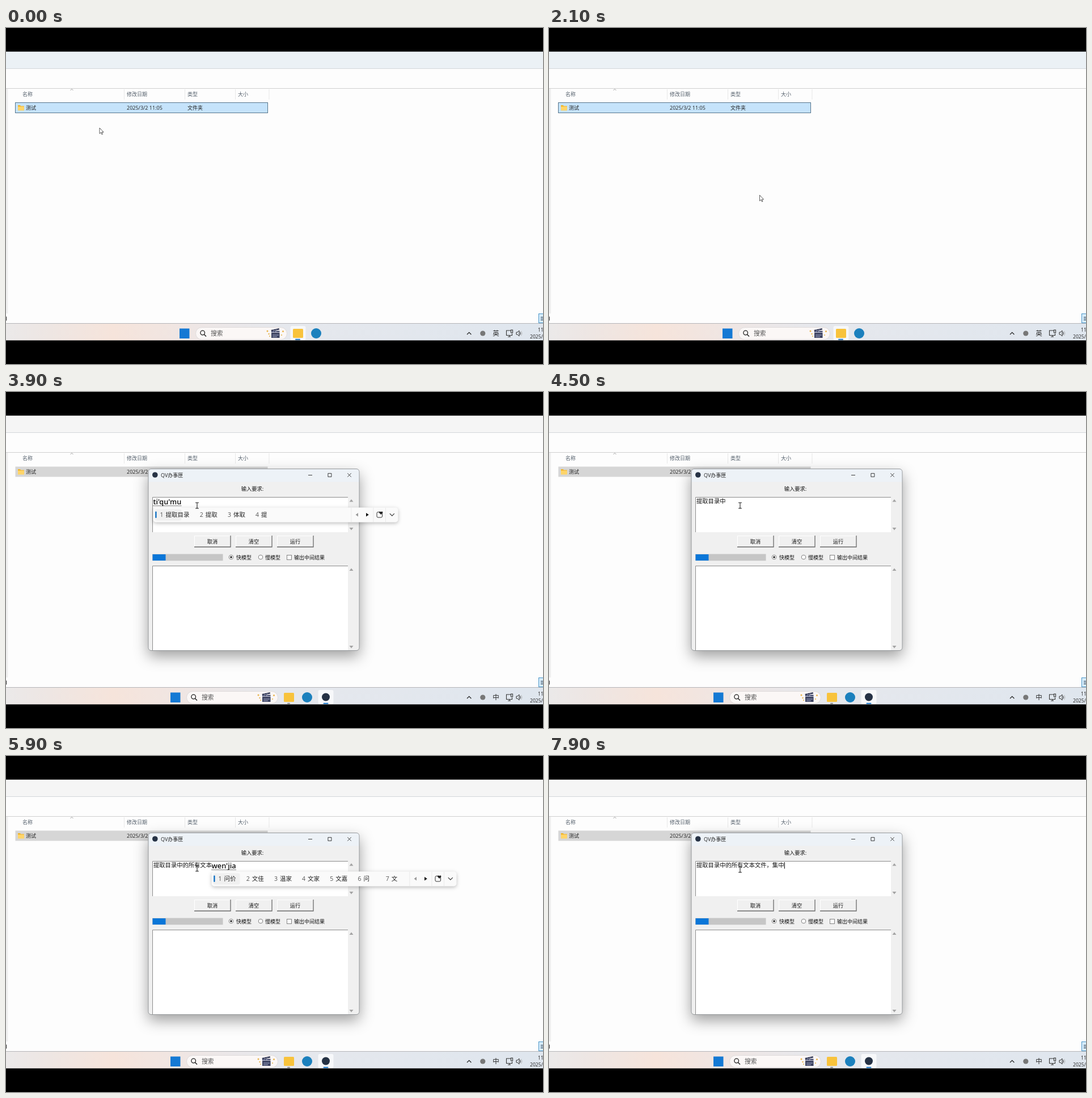
Animation of 947x592 px, one loop 8000 ms. Source, as an HTML page:

```html
<!DOCTYPE html>
<html lang="zh">
<head>
<meta charset="utf-8">
<style>
  html, body { margin: 0; width: 100%; height: 100%; overflow: hidden; background: #000; }
  svg { display: block; width: 947px; height: 592px; font-family: "Open Sans", "Noto Sans CJK SC", "Noto Sans CJK", sans-serif; }
  text { white-space: pre; }
  .entry { font-family: "Liberation Sans", "Noto Sans CJK SC", "Noto Sans CJK", sans-serif; }
  #menu { filter: drop-shadow(1px 2px 2px rgba(0,0,0,.22)); }
  #dialog .frame { filter: drop-shadow(0 10px 13px rgba(0,0,0,.38)); }
  #ime .frame { filter: drop-shadow(0 2px 3px rgba(0,0,0,.25)); }
</style>
</head>
<body>
<svg id="stage" viewBox="0 0 947 592"></svg>
<script>
const $ = id => document.getElementById(id);
const rect = (x, y, w, h, fill, more = '') =>
  `<rect x="${x}" y="${y}" width="${w}" height="${h}" fill="${fill}" ${more}/>`;
const circle = (x, y, r, fill, more = '') => `<circle cx="${x}" cy="${y}" r="${r}" fill="${fill}" ${more}/>`;
const line = (d, color, width = 1, more = '') =>
  `<path d="${d}" fill="none" stroke="${color}" stroke-width="${width}" ${more}/>`;
const shape = (d, fill, more = '') => `<path d="${d}" fill="${fill}" ${more}/>`;
// y is the middle of the glyphs
const text = (x, y, str, size = 9, fill = '#222', more = '') =>
  `<text x="${x}" y="${y + size * .37}" font-size="${size}" fill="${fill}" ${more}>${str}</text>`;
const group = (id, body) => `<g id="${id}">${body}</g>`;

const APP = 'QV办事匣';

function explorer() {
  const headers = [[29, '名称'], [213, '修改日期'], [320, '类型'], [409, '大小']];
  return rect(0, 41.5, 947, 509, '#fdfdfd') +
    rect(0, 41.5, 947, 30, '#ebf1f5', 'id="titlebar"') +
    rect(0, 71, 947, 1, '#d3d7da') + rect(0, 106, 947, 1, '#cfcfcf') +
    rect(0, 107, 3.5, 396, '#efefef') +
    headers.map(([x, s]) => text(x, 117, s, 9, '#55606c')).join('') +
    [208, 315, 404, 463.5].map(x => rect(x, 108, 1, 18, '#e8e8e8')).join('') +
    line('M113.5 110l2.5-2.5 2.5 2.5', '#888', .8) +
    rect(16.5, 131.5, 445, 18, '#c5e3fb', 'id="row"') +
    shape('M21 136h4l1 1.5h6v7.500h-11z', '#f0b429') + shape('M21 138.500h11v7h-11z', '#ffd56a') +
    text(35, 141, '测试') + text(213, 141, '2025/3/2 11:05') + text(320, 141, '文件夹') +
    rect(0, 508.500, 1.2, 7, '#444') +
    rect(939.5, 503.5, 12, 16, '#d5ebfa', 'stroke="#4b96c8"') +
    line('M943 509.5h4M943 512h4M943 514.500h4', '#345', 1);
}

function taskbar() {
  const icons =
    rect(306, 529.5, 17.5, 17.5, '#1479d4') +
    rect(334.5, 527.5, 161, 21.5, '#fbf7f6', 'rx="10.7" stroke="#dfdbdb"') +
    circle(346.7, 537, 3.8, 'none', 'stroke="#222" stroke-width="1.3"') +
    line('M349.500 540l3.500 3.500', '#222', 1.5) +
    text(361, 538.3, '搜索', 10.8, '#555') +
    rect(468, 537, 14.500, 9, '#3c4260') + rect(468, 533.5, 14.500, 2.8, '#4b5274') +
    shape('M467.500 532l14-3 .6 2.600-14 3z', '#343a56') +
    line('M471 531.5l2 2M475.500 530.5l2 2M471 537v-3M476 537v-3M470 541h11M470 544h8', '#b9bfdc', .9) +
    [[461, 534, 1.5], [463.500, 539, 1.2], [465, 543, 1], [488.500, 534.5, 1.5], [486, 541, 1.1]]
      .map(([x, y, r]) => circle(x, y, r, '#e9b44c')).join('') +
    rect(501.500, 525, 27, 25, '#fff', 'rx="3" opacity=".65" class="calm"') +
    rect(506, 530, 18, 16, '#f8c33c', 'rx="1.5"') +
    rect(510, 547.8, 9, 2, '#1976c9', 'rx="1" class="calm"') +
    rect(512, 547.8, 5, 2, '#8c8c8c', 'rx="1" class="busy"') +
    circle(547, 538, 9, '#1b80bd') +
    `<g class="busy">${rect(566.5, 525, 27, 25, '#fff', 'rx="3" opacity=".7"')}${
      circle(580, 537.5, 7, '#263245')}${rect(575.5, 547.8, 9, 2, '#1976c9', 'rx="1"')}</g>`;
  return `<linearGradient id="sky"><stop stop-color="#ebe9e9"/><stop offset=".08" stop-color="#eee6e3"/>
    <stop offset=".2" stop-color="#f6e4db"/><stop offset=".34" stop-color="#efe6e4"/>
    <stop offset=".5" stop-color="#e6e8ed"/><stop offset="1" stop-color="#dfe6ee"/></linearGradient>` +
    rect(0, 520, 947, 30.5, 'url(#sky)') + rect(0, 520, 947, 1, '#b5b5b8') +
    group('icons', icons) +
    line('M813 540l3.700-3.700 3.700 3.700', '#222', 1.2) +
    circle(840.8, 538, 4.6, '#777') +
    `<g id="lang">${text(858.3, 538, '英', 11.5)}</g>` +
    line('M890 533h-7.500v8.500h10v-3M885 544h5M888 541.500v2M890.500 532h3v5h-3z', '#333', 1.1) +
    shape('M900 536h2l3-3v10l-3-3h-2z', 'none', 'stroke="#333"') +
    line('M906.500 535.500q2 2.500 0 5', '#333') + line('M908.500 534q3 4 0 8', '#aaa', .8) +
    text(938, 532, '11:05', 8.6) + text(924, 544, '2025/3/2', 8.6);
}

const ROWS = ['打开(O)', '在新进程中打开(P)', '在新标签页中打开(B)', '在新窗口中打开(E)', '固定到快速访问(Q)',
  '在终端中打开(T)', 'Open Git GUI here', 'Open Git Bash here', APP, '在此处打开 Powershell 窗口(S)',
  '使用 Norvamill Shielder扫描...', '-', '授予访问权限(G)>', '还原以前的版本(V)', '包含到库中(I)>', '固定到“开始”(P)',
  '复制文件地址(A)', '-', '发送到(N)>', '-', '剪切(T)', '复制(C)', '-', '创建快捷方式(S)', '删除(D)', '重命名(M)', '-', '属性(R)'];

function menu() {
  let y = 118.8, out = rect(168.5, 108.5, 209.5, 411.5, '#f8f8f8', 'rx="2" stroke="#d2d2d2"') +
    rect(171, 0, 205, 16, '#efefef', 'rx="2" id="hover"');
  ROWS.forEach((row, i) => {
    if (row === '-') {
      out += rect(169, y - 5.9, 209, 1, '#dedede');
      y += 5;
      return;
    }
    if (row.endsWith('>')) out += line(`M365 ${y - 2.700}l2.700 2.700-2.700 2.700`, '#333');
    out += text(194.5, y, row.replace('>', ''), 9, '#222', i ? '' : 'font-weight="700"');
    y += 16.58;
  });
  return out + rect(175.5, 197, 11, 9.500, '#333') +
    rect(176.500, 213.500, 9, 9, '#e59a63') + rect(176.500, 230, 9, 9, '#e59a63') +
    circle(181, 251.4, 5, '#222') + circle(181, 284.6, 5.2, '#1673c8');
}

function dialog() {
  const field = (y, h) => rect(258, y, 345, h, '#fff') + line(`M258.500 ${y + h}V${y + .5}H603`, '#8c8c8c');
  const up = y => shape(`M605.5 ${y + 2}h7l-3.500-4.500z`, '#a3a3a3');
  const down = y => shape(`M605.5 ${y - 2}h7l-3.500 4.500z`, '#a3a3a3');
  const button = (x, s) => rect(x, 253, 64.500, 20.5, '#f0f0f0') +
    line(`M${x + .5} 273V253.500H${x + 64}`, '#fff') +
    line(`M${x} 273H${x + 64}V253`, '#6b6b6b', 1.3) +
    text(x + 32, 263.5, s, 9.2, '#111', 'text-anchor="middle"');
  const radio = x => circle(x, 291, 3.8, '#fff', 'stroke="#777" stroke-width=".9"');
  return rect(251, 135.5, 372, 320, '#f0f0f0', 'rx="5" class="frame"') +
    shape('M251 158.500V140.500q0-5 5-5H618q5 0 5 5V158.500z', '#edf2f7') +
    circle(262.8, 146, 4.8, '#263245') + text(273, 146.7, APP) +
    line('M533 146.500h7M567.900 143.400h6v6h-6zM602.300 143.200l6.400 6.400M608.700 143.200l-6.400 6.400', '#333', .95) +
    text(434.5, 170.5, '输入要求:', 9.3, '#111', 'text-anchor="middle"') +
    field(185, 62) + up(191.5) + down(241) +
    button(332, '取消') + button(405, '清空') + button(478, '运行') +
    rect(258, 285.5, 124.500, 11.800, '#c6c6c6') + rect(258.5, 286, 23, 11, '#0a76d8') +
    radio(397) + circle(397, 291, 1.700, '#111') + text(406, 291.5, '快模型', 9, '#111') +
    radio(449) + text(457, 291.5, '慢模型', 9, '#111') +
    rect(495.5, 287.500, 8, 8, '#fff', 'stroke="#777" stroke-width=".9"') + text(508, 291.5, '输出中间结果', 9, '#111') +
    field(306, 149) + up(313) + down(449) +
    rect(251, 135.5, 372, 320, 'none', 'rx="5" stroke="#8f9296" stroke-width=".9"') +
    group('entry', '');
}

$('stage').innerHTML = explorer() + taskbar() + group('menu', menu()) + group('dialog', dialog()) +
  group('ime', '') +
  group('arrow', shape('M0 0v10.200l2.400-2.200 1.600 3.600 1.500-.7-1.600-3.400h3.200z', '#fff', 'stroke="#333" stroke-width=".8"')) +
  group('beam', line('M-3 -5h2.200l.8 .7 .8-.7h2.200M0 -5v10M-3 5h2.200l.8-.7 .8 .7h2.200', '#222', 1.1)) +
  rect(0, 0, 947, 41.5, '#000') + rect(0, 550.5, 947, 42, '#000');

const OLD = '解压这个文件并提取里面的jpg文件到一个目录';
const FULL = '提取目录中的所有文本文件，集中';
const PITCH = 10.3, LEFT = 260;
// start, end, characters before, characters after, pinyin, candidates
const PHRASES = [
  [3500, 4400, 0, 5, "ti'qu'mu'lu'zhong", '提取目录 提取 体取 提'],
  [4700, 5100, 5, 8, "de'suo'you", '的所有 的 得 地 德'],
  [5200, 5500, 8, 10, "wen'ben", '文本 文笨 问本 温本 闻本 问 文'],
  [5550, 6050, 10, 12, "wen'jian", '问价 文佳 温家 文家 文嘉 问 文'],
  [6400, 6400, 12, 13, '', ''],
  [6900, 7600, 13, 15, "ji'zhong", '集中 几种 机种 记重 及中 集 几']];

function candidates(x0, words) {
  let x = x0 + 12, out = rect(x0, 203.5, 432, 26, '#fafafa', 'rx="5" class="frame"') +
    rect(x0 + 3, 206.5, 47, 20, '#f0f0f0', 'rx="3"') + rect(x0 + 3.800, 210.500, 2.2, 11.5, '#0067c0', 'rx="1"');
  words.forEach((word, i) => {
    out += text(x, 216.5, i + 1, 10.5, '#555') + text(x + 10, 216.5, word, 10.5);
    x += Math.max(49.2, 28.2 + 10.5 * word.length);
  });
  return out + `<g transform="translate(${x0 - 362} 0)">` +
    [711, 750, 771.500].map(v => rect(v, 204, .8, 25, '#e6e6e6')).join('') +
    shape('M723.500 213v6.500l-4.500-3.250z', '#999') + shape('M737.500 213v6.500l4.800-3.250z', '#111') +
    rect(756.500, 211.500, 9.5, 9.5, 'none', 'rx="2" stroke="#333"') +
    shape('M763.700 216l-3-3q-.6-2.600 1.500-2.500l1.500 1 1.500-1q2.300 0 1.500 2.500z', '#222') +
    line('M779.300 214.200l4 4 4-4', '#333', 1.1) + '</g>';
}

function drawEntry(t) {
  const write = (str, fill = '#111') => text(LEFT, 192.5, str, PITCH, fill, 'class="entry"');
  let body, bar = '';
  if (t < 3500) {
    const selected = t >= 3100;
    body = (selected ? rect(259, 186.500, 209.5, 12, '#0a76d8') : '') + write(OLD, selected ? '#fff' : '#111');
  } else {
    const [start, end, before, after, pinyin, words] = PHRASES.filter(p => p[0] <= t).pop();
    const typing = t < end, count = typing ? before : after, x = LEFT + count * PITCH;
    body = write(FULL.slice(0, count));
    if (typing) {
      const shown = Math.floor((t - start + 100) / (end - start) * pinyin.length);
      const part = pinyin.slice(0, Math.max(1, shown)).replace(/'$/, '');
      const list = words.split(' ');
      if (part === pinyin) list[0] = FULL.slice(before, after);
      body += `<text id="pinyin" x="${x - .5}" y="197.800" font-size="12.7" font-weight="600" fill="#111">${part}</text>`;
      bar = candidates(x - .5, list);
    } else if (t % 900 >= 300) body += rect(x + .300, 187, 1.1, 11.5, '#111');
  }
  $('entry').innerHTML = body;
  $('ime').innerHTML = bar;
  if (bar) {
    const box = $('pinyin'), x = +box.getAttribute('x');
    $('entry').innerHTML += line(`M${x} 200.500h${box.getComputedTextLength()}`, '#222', 1, 'stroke-dasharray="1.2 1"');
  }
}

const PATH = [[0, 165, 176], [200, 165, 176], [700, 168, 141], [900, 168, 141], [1000, 253.500, 239],
  [1300, 250, 250], [1900, 250, 250], [2100, 371.500, 294.500], [2400, 371.500, 294.500], [2900, 337, 200],
  [4500, 337, 200], [5500, 337, 198], [6500, 337, 198], [7000, 337, 200], [8000, 337, 200]];

function pointer(t) {
  const i = PATH.findIndex(p => p[0] > t), [t0, x0, y0] = PATH[i - 1], [t1, x1, y1] = PATH[i];
  const k = (t - t0) / (t1 - t0);
  return [x0 + (x1 - x0) * k, y0 + (y1 - y0) * k];
}

const show = (el, on) => el.setAttribute('visibility', on ? 'visible' : 'hidden');
let last = -1;

function frame() {
  const t = Math.floor(performance.now() % 8000 / 100) * 100;
  requestAnimationFrame(frame);
  if (t === last) return;
  last = t;
  const open = t >= 2900, [x, y] = pointer(t);
  $('titlebar').setAttribute('fill', open ? '#f5f5f5' : '#ebf1f5');
  $('row').setAttribute('fill', open ? '#d6d6d6' : '#c5e3fb');
  $('row').setAttribute('stroke', open ? 'none' : '#55748c');
  $('icons').setAttribute('transform', `translate(${open ? -16 : 0} 0)`);
  $('lang').querySelector('text').textContent = open ? '中' : '英';
  document.querySelectorAll('.calm').forEach(el => show(el, !open));
  document.querySelectorAll('.busy').forEach(el => show(el, open));
  $('menu').style.display = t >= 1000 && t < 1500 ? '' : 'none';
  $('hover').setAttribute('y', 110.800 + 16.58 * Math.round((y - 119.500) / 16.58));
  $('dialog').style.display = $('ime').style.display = open ? '' : 'none';
  if (open) drawEntry(t);
  for (const id of ['arrow', 'beam']) {
    show($(id), (id === 'beam') === open);
    $(id).setAttribute('transform', `translate(${x} ${y})`);
  }
}
frame();
</script>
</body>
</html>
```
